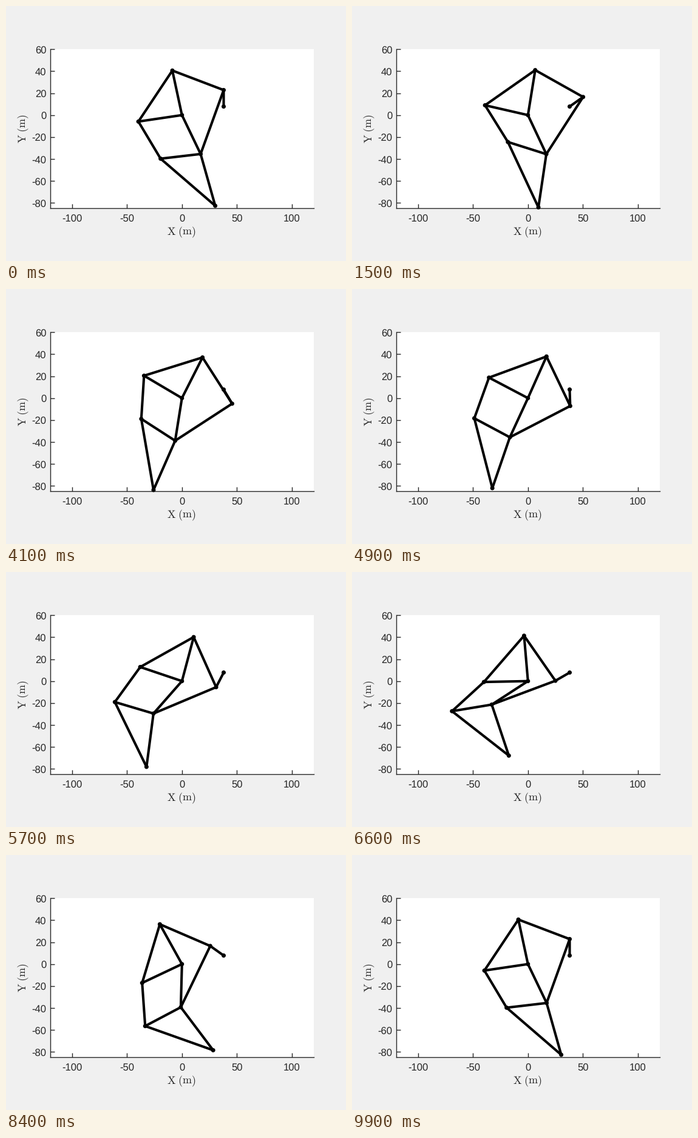
Write a matplotlib script that moves like this. It is 560 px wide and 420 px high and loops after 10000 ms.

```python
import numpy as np
import matplotlib.pyplot as plt
from matplotlib.animation import FuncAnimation
from matplotlib.patches import Circle
from matplotlib.transforms import ScaledTranslation

W, H, DPI = 560, 420, 80
PX = 72 / DPI                      # points per pixel
FRAMES = 100
INK = "#262626"

PIVOT = np.array([0.0, 0.0])
CRANK = np.array([38.0, 7.8])
RADIUS = 15.0


def joint(p, q, rp, rq):
    """Point at distance rp from p and rq from q, left of the line p to q."""
    d = q - p
    dist = np.hypot(*d)
    u = d / dist
    along = (rp**2 - rq**2 + dist**2) / (2 * dist)
    across = np.sqrt(max(rp**2 - along**2, 0))
    return p + along * u + across * np.array([-u[1], u[0]])


def pose(i):
    """Joint positions of the walking leg, crank turning clockwise."""
    t = np.pi / 2 - 2 * np.pi * i / (FRAMES - 1)
    tip = CRANK + RADIUS * np.array([np.cos(t), np.sin(t)])
    top = joint(PIVOT, tip, 41.5, 50.0)
    low = joint(tip, PIVOT, 61.9, 39.3)
    hip = joint(PIVOT, top, 40.1, 55.8)
    knee = joint(low, hip, 36.7, 39.4)
    foot = joint(low, knee, 49.0, 65.7)
    return dict(O=PIVOT, C=CRANK, P=tip, T=top, B=low, L=hip, K=knee, F=foot)


LINKS = "CP PT PB TO TL OL OB LK KB KF BF".split()

plt.rcParams.update({"font.family": "Liberation Sans", "mathtext.fontset": "cm",
                     "text.hinting": "none"})
fig = plt.figure(figsize=(W / DPI, H / DPI), dpi=DPI, facecolor="#f0f0f0")

scale = 434 / 240                  # pixels per metre
left, bottom = 72.8, H - 333.4
ax = fig.add_axes([left / W, bottom / H, 434 / W, 145 * scale / H])
ax.set(xlim=(-120, 120), ylim=(-85, 60), facecolor="white")
xt, yt = range(-100, 101, 50), range(-80, 61, 20)
ax.set_xticks(xt, [str(v) for v in xt])
ax.set_yticks(yt, [str(v) for v in yt])
ax.tick_params(direction="in", length=7 * PX, width=1.4 * PX, color=INK,
               labelcolor=INK, labelsize=16.67 * PX)
ax.tick_params(axis="x", pad=10.6 * PX)
ax.tick_params(axis="y", pad=6.5 * PX)
drop = ScaledTranslation(0, -1.2 / DPI, fig.dpi_scale_trans)
for text in ax.get_yticklabels():
    text.set_transform(text.get_transform() + drop)
ax.spines[["top", "right"]].set_visible(False)
for s in ("left", "bottom"):
    ax.spines[s].set(color=INK, linewidth=1.4 * PX)

label = dict(fontsize=18.1 * PX, color=INK, ha="center", va="baseline",
             rotation_mode="anchor")
fig.text(289.5 / W, 1 - 377 / H, r"$\mathrm{X\ (m)}$", **label)
fig.text(33.7 / W, 1 - 201.7 / H, r"$\mathrm{Y\ (m)}$", rotation=90, **label)

bars = [ax.plot([], [], "k", lw=4.1 * PX, clip_on=False, snap=False,
                solid_capstyle="butt", zorder=5)[0] for _ in LINKS]
dots = {k: ax.add_patch(Circle((0, 0), 3.5 / scale, fc="k", lw=0,
                               clip_on=False, zorder=6)) for k in pose(0)}


def draw(i):
    pts = pose(i)
    for bar, (a, b) in zip(bars, LINKS):
        bar.set_data(*zip(pts[a], pts[b]))
    for k, dot in dots.items():
        dot.center = pts[k]
    return [*bars, *dots.values()]


anim = FuncAnimation(fig, draw, frames=FRAMES, interval=100, repeat=True,
                     repeat_delay=0, blit=False)
plt.show()
```
